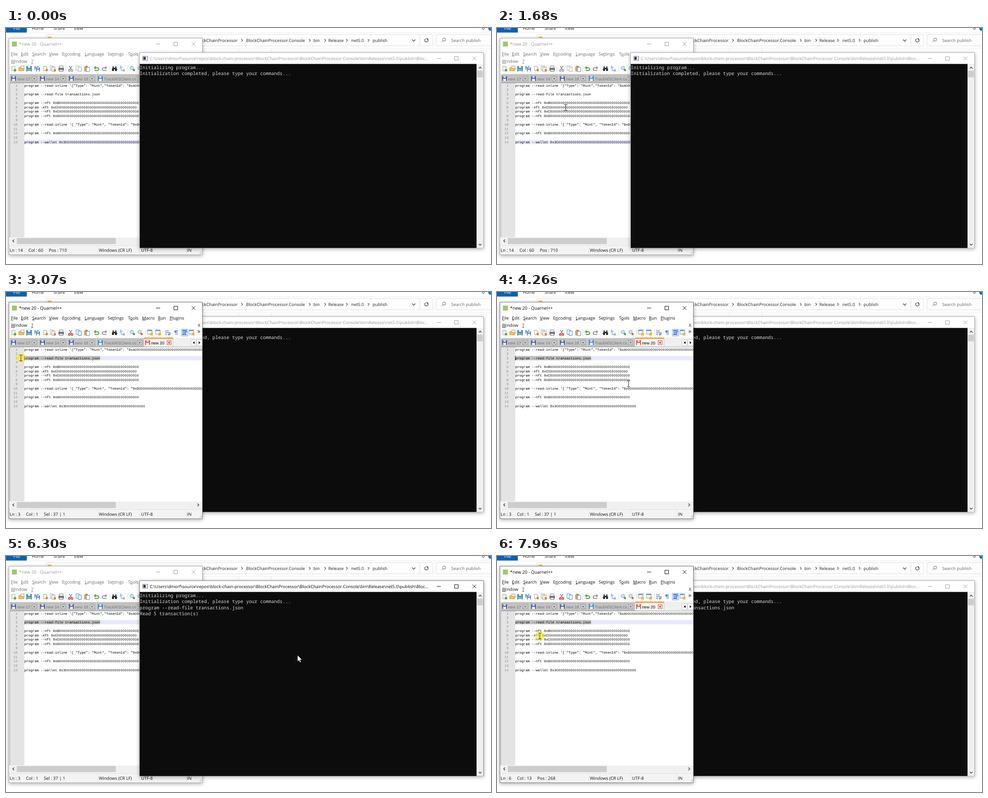
An HTML page for the animation above (8 s loop, 1073x522 px).

```html
<!DOCTYPE html>
<html lang="en">
<head>
<meta charset="utf-8">
<title>Console demo</title>
<style>
  html, body { margin: 0; width: 100%; height: 100%; overflow: hidden; background: #fff; }
  #stage { display: block; width: 1073px; height: 522px; }
  text { font: 9.55px "Open Sans", "Noto Sans", sans-serif; fill: #111; white-space: pre; text-rendering: geometricPrecision; }
  .crumb { font-size: 9.5px; fill: #222; }
  .soft { fill: #666; }
  .file { fill: #fff; }
  .more { font-size: 13px; }
  .tab { font: 9px "Liberation Sans", sans-serif; fill: #777; }
  .on { fill: #000; }
  .swap { fill: #2f6cc0; }
  .code { font: 7.55px "Liberation Mono", monospace; fill: #000; }
  .zeros { font: 7px "Liberation Sans", sans-serif; letter-spacing: .637px; }
  .num { font: 7.55px "Liberation Mono", monospace; fill: #888; text-anchor: end; }
  .con { font: 500 10.33px "Noto Sans Mono", monospace; fill: #d8d8d8; }
  .key { text-decoration: underline; }
  .line { fill: none; stroke: #222; }
  .frame { fill: #fff; stroke: #aaa; filter: drop-shadow(0 2px 4px #0005); }
  .cap text { font-size: 9.8px; fill: #999; }
  #console .cap text { font-size: 9.55px; }
  .cap .line { stroke: #999; }
  .menu text { fill: #6d6d6d; }
  .np-top .menu text { fill: #111; }
  .np-lit #editor .cap text, .con-lit #console .cap text { fill: #000; }
  .np-lit #editor .cap .line, .con-lit #console .cap .line { stroke: #000; }
  .np-lit #editor .frame, .con-lit #console .frame { stroke: #777; }
  .cut { stroke: #999; }
  .copy { stroke: #aaa; }
  .selected .cut { stroke: #d02020; }
  .selected .copy { stroke: #3a86d8; }
</style>
</head>
<body>
<svg id="stage" viewBox="0 0 1073 522">
  <g id="explorer"></g>
  <g id="editor"></g>
  <g id="console"></g>
  <g id="pointer">
    <circle id="halo" r="10.3" fill="#ffec00" opacity=".56"/>
    <path id="arrow" d="M0 0V14L3.2 11L5.5 16L7.7 15L5.5 10.3H10Z" fill="#fff" stroke="#222" stroke-width=".7"/>
    <path id="beam" d="M-3.5-6.5H-1L0-6L1-6.5H3.5M0-6V6M-3.5 6.5H-1L0 6L1 6.5H3.5" fill="none" stroke="#222"/>
  </g>
</svg>
<script>
const LOOP = 8000;
const CHAR = 4.53, ROW = 9.62, LEFT = 40.5;
const $ = id => document.getElementById(id);
const stage = $('stage');

const rect = (x, y, w, h, fill, more = '') =>
  `<rect x="${x}" y="${y}" width="${w}" height="${h}" fill="${fill}" ${more}/>`;
const text = (x, y, s, cls = '', id = '') =>
  `<text x="${x}" y="${y}" class="${cls}" ${id && `id="${id}"`}>${s}</text>`;
const path = (d, more = 'class="line"') => `<path d="${d}" ${more}/>`;
const stroke = (color, width = 1) => `fill="none" stroke="${color}" stroke-width="${width}"`;
const dot = (x, y, r, fill) => `<circle cx="${x}" cy="${y}" r="${r}" fill="${fill}"/>`;
const right = (x, y) => path(`M${x - 1.5} ${y - 3}L${x + 1.5} ${y}L${x - 1.5} ${y + 3}`, stroke('#444', 1.2));
const down = (x, y, color) => path(`M${x - 3.5} ${y - 2}L${x} ${y + 2}L${x + 3.5} ${y - 2}`, stroke(color, 1.3));
const buttons = (x, y) =>
  path(`M${x} ${y}h9M${x + 39.5} ${y - 4}h8v8h-8zM${x + 79} ${y - 4}l8 8m0 -8l-8 8`);

// File manager behind both windows
$('explorer').innerHTML =
  rect(0, 0, 1073, 522, '#fff') +
  rect(0, 0, 46, 10, '#0063b1') + rect(0, 10.5, 1073, .7, '#e4e4e4') +
  text(16, 4.4, 'File', 'crumb file') + text(57, 4.4, 'Home', 'crumb') +
  text(105, 4.4, 'Share', 'crumb') + text(150, 4.4, 'View', 'crumb') +
  down(1056, 1.5, '#777') + dot(1072, 1, 5, '#0078d7') +
  [[88.5, 827], [915.5, 28], [951.5, 130]].map(([x, w]) => rect(x, 14.5, w, 25, '#fff', 'stroke="#ddd"')).join('') +
  rect(92, 19, 9, 8, '#f3c64f') +
  text(419.5, 30.7, 'BlockChainProcessor', 'crumb') +
  text(531, 30.7, 'BlockChainProcessor.Console', 'crumb') +
  text(680, 30.7, 'bin', 'crumb') + text(713, 30.7, 'Release', 'crumb') +
  text(764, 30.7, 'net5.0', 'crumb') + text(811, 30.7, 'publish', 'crumb') +
  [522, 672, 706, 754, 802].map(x => right(x, 27.3)).join('') +
  down(902, 27.5, '#444') +
  path('M928 24A3.8 3.8 0 1 0 932.5 24.2M932.8 27V23.7H929.4', stroke('#333', 1.2)) +
  path('M967 28L963.5 31.5', stroke('#666')) +
  `<circle cx="969.5" cy="25.5" r="3.4" ${stroke('#666')}/>` +
  text(985, 30.8, 'Search publish', 'crumb soft') +
  rect(436, 45, 637, .7, '#e8e8e8') + rect(514, 46, .8, 9, '#e2e2e2') + rect(586, 46, .8, 9, '#e2e2e2');

// Toolbar icons, each drawn around 0,0
const page = (x = -4, y = -5, more = 'stroke="#999"') => rect(x, y, 7, 9.5, '#fff', more);
const disk = (x, y, s, c) => rect(x, y, s, s, c, 'rx=".8"') +
  rect(x + s * .25, y, s * .5, s * .35, '#dfe8f5') + rect(x + s * .2, y + s * .55, s * .6, s * .45, '#fff');
const lens = c => path('M1 1L5 5', stroke('#a8793a', 1.8)) +
  `<circle cx="-1.5" cy="-1.5" r="3.8" fill="#cfe6f8" stroke="#7a9ab8"/>` + dot(3, 3, 2.4, c);
const pane = rect(-6, -6, 10, 9, '#fff', 'stroke="#7595b8"') + rect(-6, -6, 10, 2.4, '#5b93d0') + rect(0, 0, 6, 6, '#f0b63e');
const icons = {
  17: page() + dot(3, 3.5, 2.7, '#4aa83f'),
  34: page(-1, -6) + path('M-6 5V-3H-2L-1-1H6L4 5Z', 'fill="#f5bd4b" stroke="#c98a25" stroke-width=".6"'),
  51: disk(-6, -6, 12, '#3f7fc4') + rect(-3, 1, 6, 4, '#83bf55'),
  69: disk(-6, -6, 8.5, '#5b8fce') + disk(-2.5, -2.5, 8.5, '#4078bd'),
  87: page() + dot(3, 3, 2.7, '#e87b23'),
  104: page(-6, -6) + page(-2.5, -3.5) + dot(4, 3.5, 2.6, '#e87b23'),
  122: rect(-4, -6, 8, 5, '#fff', 'stroke="#777"') + rect(-6, -2, 12, 6, '#777') + rect(-4, 2, 8, 4, '#eef4fb', 'stroke="#668"'),
  143: path('M-3-6L2 2M3-6L-2 2', stroke('#888', 1.5)) +
    `<g class="cut" fill="none" stroke-width="1.5"><circle cx="-3" cy="4" r="1.9"/><circle cx="3" cy="4" r="1.9"/></g>`,
  161: page(-6, -6, 'class="copy"') + page(-1.5, -3.5, 'class="copy"'),
  179: rect(-6, -5, 9, 11, '#e0a54a', 'rx="1"') + rect(-3, -6.5, 4, 3, '#888') + page(-1, -3, 'stroke="#5a8dc5"'),
  200: path('M-4 4H2A3 3 0 0 0 2-2H-4M-1.5-5L-4.5-2L-1.5 1', stroke('#5f9f45', 2)),
  218: path('M4 4H-2A3 3 0 0 1-2-2H4M1.5-5L4.5-2L1.5 1', stroke('#999', 2)),
  240: rect(-5.5, -1, 4.5, 6, '#222', 'rx="1"') + rect(1, -1, 4.5, 6, '#222', 'rx="1"') +
    rect(-4.5, -5, 3, 5, '#444') + rect(1.5, -5, 3, 5, '#444') + rect(-2, -2, 4, 3, '#333'),
  258: text(-6, 0, 'b', 'tab swap') + text(0, 6, 'a', 'tab swap') + path('M-3 1V4H0', stroke('#3a76c8')),
  280: lens('#46a33c'),
  297: lens('#e0692a'),
  319: pane,
  337: pane,
  358: path('M-6-4H2M-6 0H5V4H1M-6 4H-2', stroke('#5280b8', 1.4)) + path('M3 1.5L0 4L3 6.5Z', 'fill="#3a76c8"'),
  376: path('M4-4.5H-1M0-4.5V5M3-4.5V5', stroke('#4d8fdc', 1.2)) + dot(-1.2, -2.5, 2.5, '#4d8fdc'),
  395: rect(-7, -7.5, 14, 15, '#cde6fb', 'stroke="#7ebcf0"') + path('M-5-5H5M-1-2H6M-1 1H3M-5 4H4', stroke('#1e3fd0', 1.6)) + path('M-3-4V4', stroke('#1e3fd0')),
  411: pane
};
const toolbar = Object.entries(icons).map(([x, g]) => `<g transform="translate(${x} 90)">${g}</g>`).join('') +
  [132, 190, 229, 268.5, 308, 347.5].map(x => rect(x, 84, .7, 13, '#d5d5d5')).join('');

const menuItem = (x, y, s) => text(x, y, s.replace(/&(.)/, '<tspan class="key">$1</tspan>'));
const menu = [[11, '&File'], [33, '&Edit'], [58, '&Search'], [95, '&View'], [124, 'E&ncoding'], [174, '&Language'],
  [225, 'Se&ttings'], [270, 'T&ools'], [301, '&Macro'], [336, '&Run'], [362, '&Plugins']]
  .map(([x, s]) => menuItem(x, 60.6, s)).join('') +
  menuItem(11, 76.7, '&Window') + menuItem(56, 76.7, '&?') + text(424.5, 76.7, 'X');

const tab = (x, w, name, color, on) =>
  (on ? rect(x, 101, w, 20.5, '#f3f3f3', 'stroke="#aaa" stroke-width=".6"') + rect(x, 101, w, 2.8, '#faa03c')
      : rect(x, 103, w, 18, '#c2c2c2', 'stroke="#999" stroke-width=".6"')) +
  disk(x + 2.5, 106.5, 10.5, color) + text(x + 15.5, 115.6, name, on ? 'tab on' : 'tab') +
  rect(x + w - 13, 107.5, 9, 9, on ? '#fff' : '#eee', `stroke="${on ? '#c44' : '#888'}" stroke-width=".9"`) +
  path(`M${x + w - 11} 109.5l5 5m0 -5l-5 5`, stroke(on ? '#c22' : '#666', 1.2));
const tabs = rect(8, 101, 426, 21, '#f0f0f0') +
  [[9, 'new 17'], [73, 'new 14'], [137, 'new 18']].map(([x, s]) => tab(x, 62, s, '#4658a8')).join('') +
  tab(201, 103, 'TrackWSClient.cs', '#2f8ad8') + tab(305.5, 64, 'new 20', '#e8473c', true) +
  [409, 422].map(x => rect(x, 105.5, 12, 13, '#fafafa', 'stroke="#bbb" stroke-width=".7"')).join('') +
  path('M417 109V115L413.5 112ZM426.5 109V115L430 112Z', 'fill="#000"');

const hash = head => `${head}<tspan class="zeros">${'0'.repeat(39)}</tspan>`;
const command = 'program --read-file transactions.json';
const code = {
  1: hash(`program --read-inline '{"Type": "Mint","TokenId": "0xA`),
  3: command,
  5: hash('program --nft 0xB'),
  6: hash('program -nft 0xC'),
  7: hash('program --nft 0xC'),
  8: hash('program --nft 0xD'),
  10: hash(`program --read-inline '{ "Type": "Mint", "TokenId": "0xD`),
  12: hash('program --nft 0xD'),
  14: hash('program --wallet 0x3')
};
const baseline = n => 129.5 + ROW * (n - 1);
const rowTop = n => baseline(n) - 7.3;
const numbers = Array.from({ length: 14 }, (_, i) => text(25.5, baseline(i + 1), i + 1, 'num')).join('');
const lines = Object.entries(code).map(([n, s]) => text(LEFT, baseline(n), s, 'code')).join('');

$('editor').innerHTML =
  rect(6.5, 22.5, 428, 479, '#fff', 'class="frame"') +
  `<g class="cap">${rect(13, 30, 11, 11, '#9ccb6a')}${text(29, 39.4, '*new 20 - Quarnel++')}${buttons(332, 35.5)}</g>` +
  `<g class="menu">${menu}</g>` + rect(7, 81, 427, 20, '#fbfbfb') + toolbar +
  text(423.5, 91, '»', 'more') + tabs +
  `<svg x="9" y="122" width="425" height="341" viewBox="9 122 425 341">` +
  rect(9, 122, 425, 341, '#fff') + rect(9, 122, 31.5, 341, '#e4e4e4') +
  rect(40.5, 0, 394, ROW, '#e8e8ff', 'id="current"') + rect(0, rowTop(3), 0, ROW, '#c0c0c0', 'id="selection"') +
  numbers + lines + rect(0, rowTop(3), .9, ROW, '#000', 'id="caret"') + '</svg>' +
  path('M8.5 463V121.7H434', stroke('#888', .8)) +
  rect(9, 463.5, 425, 15.5, '#f0f0f0') + rect(24, 464.5, 219, 13.5, '#cdcdcd') +
  path('M18 468L14.8 471L18 474M423.5 468L426.7 471L423.5 474', stroke('#333', 1.3)) +
  rect(7, 480, 427, 21, '#f3f3f3') + rect(7, 480, 427, .7, '#ccc') +
  [203, 296, 398].map(x => rect(x, 483, .7, 16, '#d8d8d8')).join('') +
  text(8, 495.4, '', '', 'status') + text(205.5, 495.4, 'Windows (CR LF)') + text(299, 495.4, 'UTF-8') + text(400.5, 495.4, 'IN') +
  path('M428 499L433 494M431 499L433 497', stroke('#aaa'));

const conRow = n => 90.8 + 13.45 * (n - 1);
const folder = 'C:\\Users\\dmorf\\source\\repos\\block-chain-processor\\BlockChainProcessor\\BlockChainProcessor.Console\\bin\\Release\\net5.0\\publish\\Bloc...';
$('console').innerHTML =
  rect(295.5, 54.5, 761, 432, '#fff', 'class="frame"') +
  `<g class="cap">${rect(302.5, 62.5, 11, 9, '#eef3f8', 'stroke="#777"')}${rect(304, 64, 5, 6, '#1d3556')}` +
  text(318, 71, folder) + buttons(953, 67.3) + '</g>' +
  rect(296, 79.5, 745, 407, '#0c0c0c') +
  rect(1041, 79.5, 15, 407, '#f0f0f0') + rect(1042, 94.5, 13, 14.5, '#cdcdcd') +
  path('M1046 89.5L1049 86.5L1052 89.5M1046 477.5L1049 480.5L1052 477.5', stroke('#333', 1.4)) +
  text(295.7, conRow(1), 'Initializing program...', 'con') +
  text(295.7, conRow(2), 'Initialization completed, please type your commands...', 'con') +
  text(295.7, conRow(3), command, 'con', 'pasted') +
  text(295.7, conRow(4), 'Read 5 transaction(s)', 'con', 'result') +
  rect(0, 0, 6.2, 3, '#ccc', 'id="prompt"');

// Pointer moves: start, end, number of steps, Bézier points
const moves = [
  [230, 990, 11, [[968, 524], [860, 500], [704, 424]]],
  [1070, 1680, 9, [[704, 424], [152, 176]]],
  [1850, 2370, 8, [[152, 176], [222, 148]]],
  [2770, 3070, 5, [[222, 148], [33, 146]]],
  [3160, 3230, 2, [[33, 146], [14, 147]]],
  [4120, 4430, 5, [[14, 147], [450, 250], [645, 219.5]]],
  [7170, 7760, 9, [[645, 219.5], [520, 260], [200, 85], [95, 177]]]
];
const ease = u => u * u * (3 - 2 * u);
const bezier = (pts, u) => pts.length === 1 ? pts[0] :
  bezier(pts.slice(1).map((p, i) => p.map((v, j) => pts[i][j] + (v - pts[i][j]) * u)), u);

function pointerAt(t) {
  const move = moves.filter(m => t >= m[0]).pop();
  if (!move) return [-50, -50];
  const [from, to, n, pts] = move;
  const step = Math.min(n, Math.floor((t - from) / (to - from) * (n - 1) + 1e-6) + 1);
  return bezier(pts, ease(step / n));
}

const set = (id, attrs) => { for (const k in attrs) $(id).setAttribute(k, attrs[k]); };
const show = (id, on) => { $(id).style.display = on ? '' : 'none'; };
const within = (t, a, b) => t >= a && t < b;
let front = '';

function render(t) {
  const editorTop = within(t, 2640, 4580) || t >= 7960;
  const [x, y] = pointerAt(t);
  const col = t < 3400 ? Math.max(1, Math.min(38, Math.round((x - LEFT) / CHAR) + 1)) : 1;
  const head = t < 2640 ? 38 : col;

  const top = editorTop ? 'editor' : 'console';
  if (top !== front) stage.insertBefore($(front = top), $('pointer'));
  stage.classList.toggle('np-top', editorTop);
  stage.classList.toggle('np-lit', editorTop && t >= 2690);
  stage.classList.toggle('con-lit', within(t, 4580, 7960));
  stage.classList.toggle('selected', head < 38);

  const headX = LEFT + (head - 1) * CHAR;
  set('current', { y: rowTop(t < 2640 ? 14 : 3) });
  set('selection', { x: headX, width: (38 - head) * CHAR });
  set('caret', { x: headX - .4 });
  show('caret', within(t, 2640, 3630) || within(t, 4160, 4580));
  const status = t < 2640 ? ['Ln : 14', 'Col : 60', 'Pos : 710']
    : t >= 7960 ? ['Ln : 6', 'Col : 13', 'Pos : 268']
    : ['Ln : 3', `Col : ${head}`, head === 38 ? 'Pos : 194' : `Sel : ${38 - head} | 1`];
  $('status').textContent = status.join('     ');

  show('pasted', t >= 5040);
  show('result', t >= 6300);
  show('prompt', within(t, 5670, 6300));
  set('prompt', t < 6070 ? { x: 525.5, y: 117.8 } : { x: 296, y: 131.2 });

  const margin = x < 40 && t >= 3400;
  const beam = !margin && x < (editorTop ? 436 : 296);
  set('pointer', { transform: `translate(${x} ${y})` });
  set('arrow', { transform: `scale(${margin ? -1 : 1} 1)` });
  show('arrow', !beam);
  show('beam', beam);
  show('halo', within(t, 2640, 3400) || within(t, 4580, 4890) || t >= 7960);
}

const start = performance.now();
function tick() {
  render((performance.now() - start) % LOOP);
  requestAnimationFrame(tick);
}
tick();
</script>
</body>
</html>
```
